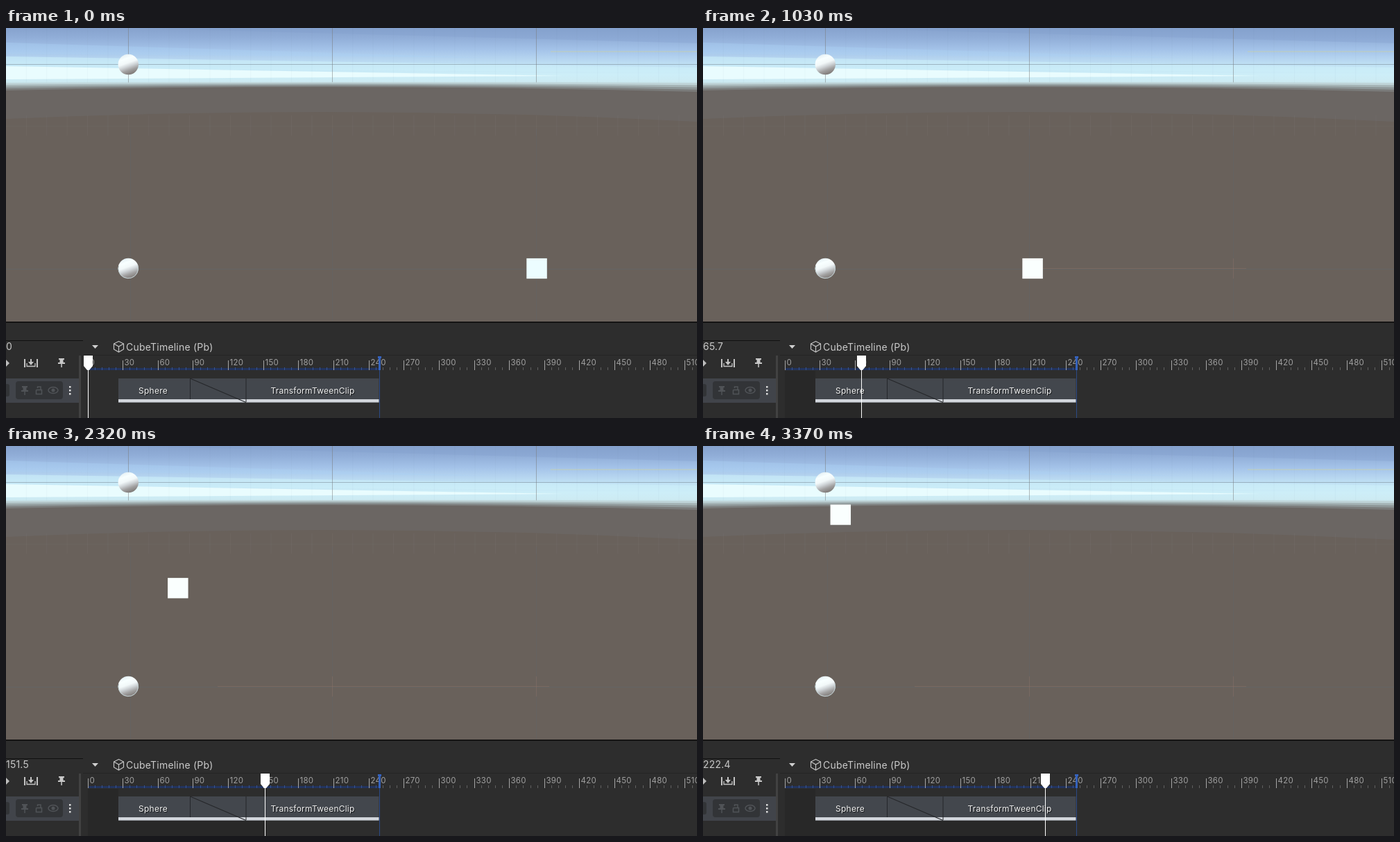
An HTML page with a canvas that plays this animation: 996x562 px, repeating every 3400 ms.

```html
<!DOCTYPE html>
<html lang="en">
<head>
<meta charset="utf-8">
<title>Timeline tween</title>
<style>
html, body { margin: 0; width: 100%; height: 100%; overflow: hidden; background: #2d2d2d; }
canvas { display: block; }
</style>
</head>
<body>
<canvas id="stage" width="996" height="562"></canvas>
<script>
const W = 996, H = 562, LOOP = 3400;
const SPAN = 294, LEFT = 176.3, LOW = 346.5;
const FIRST = 118, SCALE = 1.688;
// Playback clock: milliseconds to timeline position
const CLOCK = [[70, 1.4], [490, 29.5], [1030, 65.7], [1540, 99.7], [2320, 151.5], [2950, 194.6], [3370, 222.4]];
const view = document.getElementById('stage').getContext('2d');
const backdrop = document.createElement('canvas');
backdrop.width = W;
backdrop.height = H;
let c = backdrop.getContext('2d');

function rect(x, y, w, h, color) {
  c.fillStyle = color;
  c.fillRect(x, y, w, h);
}

function line(color, width, ...p) {
  c.strokeStyle = color;
  c.lineWidth = width;
  c.beginPath();
  for (let i = 0; i < p.length; i += 2) c.lineTo(p[i], p[i + 1]);
  c.stroke();
}

function poly(color, ...p) {
  c.fillStyle = color;
  c.beginPath();
  for (let i = 0; i < p.length; i += 2) c.lineTo(p[i], p[i + 1]);
  c.fill();
}

function text(str, x, y, size, color, align = 'left') {
  c.font = `${size}px Inter, sans-serif`;
  c.letterSpacing = '0.22px';
  c.textAlign = align;
  c.fillStyle = color;
  c.fillText(str, x, y);
}

function gradient(g, stops) {
  stops.forEach(([at, color]) => g.addColorStop(at, color));
  return g;
}

function groundLayer(left, middle, right, color) {
  c.fillStyle = color;
  c.beginPath();
  c.moveTo(0, left);
  c.quadraticCurveTo(W / 2, 2 * middle - (left + right) / 2, W, right);
  c.lineTo(W, 424);
  c.lineTo(0, 424);
  c.fill();
}

function sphere(y, rim) {
  const g = c.createLinearGradient(LEFT - 5, y - 14, LEFT + 5, y + 14);
  c.fillStyle = gradient(g, [[0, '#e6f1f5'], [.2, '#f8ffff'], [.42, '#f2f8f9'], [.58, '#d0d5d8'], [.78, '#a09f9f'], [1, '#7d7875']]);
  c.beginPath();
  c.arc(LEFT, y, 14.7, 0, 7);
  c.fill();
  if (!rim) return;
  c.strokeStyle = '#c4d3d6';
  c.lineWidth = 1;
  c.beginPath();
  c.arc(LEFT, y, 14.2, -.3, 3.4);
  c.stroke();
}

function drawScene() {
  rect(0, 0, W, 95, gradient(c.createLinearGradient(0, 0, 0, 90), [
    [0, '#86a2cd'], [.16, '#91aed8'], [.34, '#a3c2e8'], [.48, '#b4d3ef'],
    [.6, '#c1e2f4'], [.74, '#cdeef8'], [.85, '#cdebf3'], [1, '#b7ccd0']]));
  poly('rgba(128,158,204,.35)', 180, 0, W, 0, W, 22);
  poly('rgba(170,208,242,.4)', 0, 21, 700, 43, 0, 37);
  poly('rgba(205,240,250,.6)', 0, 41, W, 57, W, 64, 0, 58);
  poly('#e9fcfe', 0, 55, 803, 69, 0, 74);
  line('rgba(190,205,190,.6)', 2, 785, 34, W, 34);

  for (let i = -6; i < 28; i++) {
    const x = LEFT + i * 29.4;
    line('rgba(120,140,160,.05)', 1, x, 0, x, 80);
  }
  for (const x of [176.5, 470.5, 764.5]) line('rgba(125,125,125,.5)', 1, x, 0, x, 84);
  line('rgba(115,130,140,.5)', 1, 0, 52.5, W, 52.5);

  // Haze starts level and bends into the curved horizon
  ['#bfd4d8', '#a5b4b6', '#8e9798', '#7a7b7a', '#6b6663'].forEach((color, i) => {
    const k = i / 4;
    groundLayer(79 + 11 * k, 78 + 7 * k, 79 + 13 * k, color);
  });
  groundLayer(131, 121, 135, '#69615b');
  for (let i = -6; i < 28; i++) {
    const x = LEFT + i * 29.4;
    line('rgba(135,130,128,.18)', 1, x, 126, x, 155);
  }
  line('rgba(130,130,128,.1)', 1, 0, 141.5, W, 141.5);
  for (const x of [179.5, 470.5, 764.5]) line('rgba(92,108,112,.3)', 1, x, 145, x, 422);
  line('rgba(92,108,112,.4)', 1, 0, 347.5, W, 347.5);
  sphere(52.5);
  sphere(LOW, true);
}

function pin(x, y, color) {
  rect(x - 4, y - 6, 8, 2, color);
  rect(x - 2.5, y - 4, 5, 5, color);
  rect(x - 5, y, 10, 2, color);
  rect(x - .7, y + 2, 1.5, 5, color);
}

function drawTrackHeader() {
  rect(0, 505, 105, 35, '#41444a');
  c.fillStyle = '#323437';
  c.beginPath();
  c.roundRect(-8, 513, 13, 18, 3);
  c.roundRect(14, 509, 68, 26, 4);
  c.fill();
  const dim = '#505357';
  pin(27, 522, dim);
  line(dim, 1.5, 43.5, 521.5, 51.5, 521.5, 51.5, 527.5, 43.5, 527.5, 43.5, 521.5);
  line(dim, 1.5, 45.5, 519, 45.5, 517, 50, 517, 50, 521);
  c.beginPath();
  c.ellipse(68, 522, 7, 4.5, 0, 0, 7);
  c.stroke();
  c.fillStyle = dim;
  c.beginPath();
  c.arc(68, 522, 2.5, 0, 7);
  c.fill();
  for (const y of [516, 521, 526]) rect(91, y, 2.5, 2.5, '#dedede');
}

function drawRuler() {
  rect(118, 490, 420, 3, '#22345f');
  for (let i = 0; i <= 88; i++) {
    const x = Math.floor(FIRST + i * 6 * SCALE) + .5;
    if (i % 5) line(x < 538 ? '#38548f' : '#606060', 1, x, 489, x, 493);
    else {
      line('#a6a6a6', 1, x, 479, x, 493);
      text(i * 6, x + 2, 486, 11.5, '#a0a0a0');
    }
  }
}

function clipLabel(str, x) {
  text(str, x + 1, 528, 12, '#181a1c', 'center');
  text(str, x, 527, 12, '#f2f2f2', 'center');
}

function drawPanel() {
  rect(0, 423, W, 139, '#2d2d2d');
  rect(0, 423, W, 2, '#151413');
  rect(0, 450, 111, 1, '#111');
  rect(111, 471, W, 1, '#252525');
  rect(105, 472, 3, 90, '#424242');
  poly('#d0d0d0', 124, 457, 133, 457, 128.5, 462);

  const grey = '#c4c4c4';
  line(grey, 1.2, 162.5, 451.5, 169.5, 455, 169.5, 463, 162.5, 467, 155.5, 463, 155.5, 455, 162.5, 451.5);
  line(grey, 1.2, 155.5, 455, 162.5, 459, 169.5, 455);
  line(grey, 1.2, 162.5, 459, 162.5, 467);
  text('CubeTimeline (Pb)', 173, 464.5, 14, '#cacaca');

  poly('#bdbdbd', 0, 478, 5, 483, 0, 488);
  rect(26, 477, 2, 12, grey);
  rect(44, 477, 2, 12, grey);
  line(grey, 1.3, 30, 483, 30, 487.5, 42, 487.5, 42, 483);
  rect(35, 477, 2, 5, grey);
  poly(grey, 32, 481, 40, 481, 36, 486);
  pin(80, 482, '#c8c8c8');

  drawTrackHeader();
  drawRuler();

  rect(162, 505, 375.5, 35, '#43474d');
  rect(162, 535, 375.5, 4.5, '#d2d6dc');
  line('#25272a', 1, 265.5, 505, 265.5, 535);
  line('#25272a', 1.2, 265.5, 505, 346, 539.5);
  line('#25272a', 1, 346, 505, 346, 539);
  clipLabel('Sphere', 212);
  clipLabel('TransformTweenClip', 442);
  rect(538, 473, 1, 89, '#2b4a86');
  rect(536, 473, 5, 3, '#3562bb');
  rect(537, 476, 3, 17, '#3562bb');
}

function positionAt(ms) {
  if (ms < 70) return 0;
  const t = 70 + Math.floor((ms - 70) / 30) * 30;
  const i = Math.max(1, CLOCK.findIndex(p => p[0] >= t));
  const [t0, f0] = CLOCK[i - 1], [t1, f1] = CLOCK[i];
  return f0 + (f1 - f0) * (t - t0) / (t1 - t0);
}

// The cube chases a target that blends smoothly from the low sphere to the high one
function cubeAt(pos) {
  const x = LEFT + 588.7 * Math.exp(-Math.max(0, pos - 25) / 60);
  let rise = 0;
  const step = .25;
  for (let s = 87; s < pos; s += step) {
    const u = Math.min(1, (s - 87) / 48);
    rise += (SPAN * u * u * (3 - 2 * u) - rise) * step / 60;
  }
  return [x, LOW - rise];
}

function draw(ms) {
  const pos = positionAt(ms), [x, y] = cubeAt(pos);
  const head = Math.floor(FIRST + pos * SCALE);
  c.drawImage(backdrop, 0, 0);

  const trail = 'rgba(150,115,100,.4)';
  if (x < 750) {
    line(trail, 1, Math.max(305, x), 346.5, 783, 346.5);
    line(trail, 1, 764.5, 332, 764.5, 361);
  }
  if (x < 456) line(trail, 1, 470.5, 332, 470.5, 361);
  rect(x - 14.7, y - 14.6, 29.5, 29.3, pos < 25 ? '#ecfdff' : '#fafffe');

  text(String(+pos.toFixed(1)), 0, 464, 14, '#c8c8c8');
  rect(118, 540, head - 118, 22, 'rgba(0,0,0,.1)');
  rect(118, 494, Math.min(head, 162) - 118, 46, 'rgba(0,0,0,.1)');
  rect(head, 490, 1, 72, '#fff');
  poly('#fff', head - 6, 472, head + 7, 472, head + 7, 487, head + 2, 493, head - 1, 493, head - 6, 487);
}

drawScene();
drawPanel();
c = view;
function tick() {
  draw(performance.now() % LOOP);
  requestAnimationFrame(tick);
}
tick();
</script>
</body>
</html>
```
